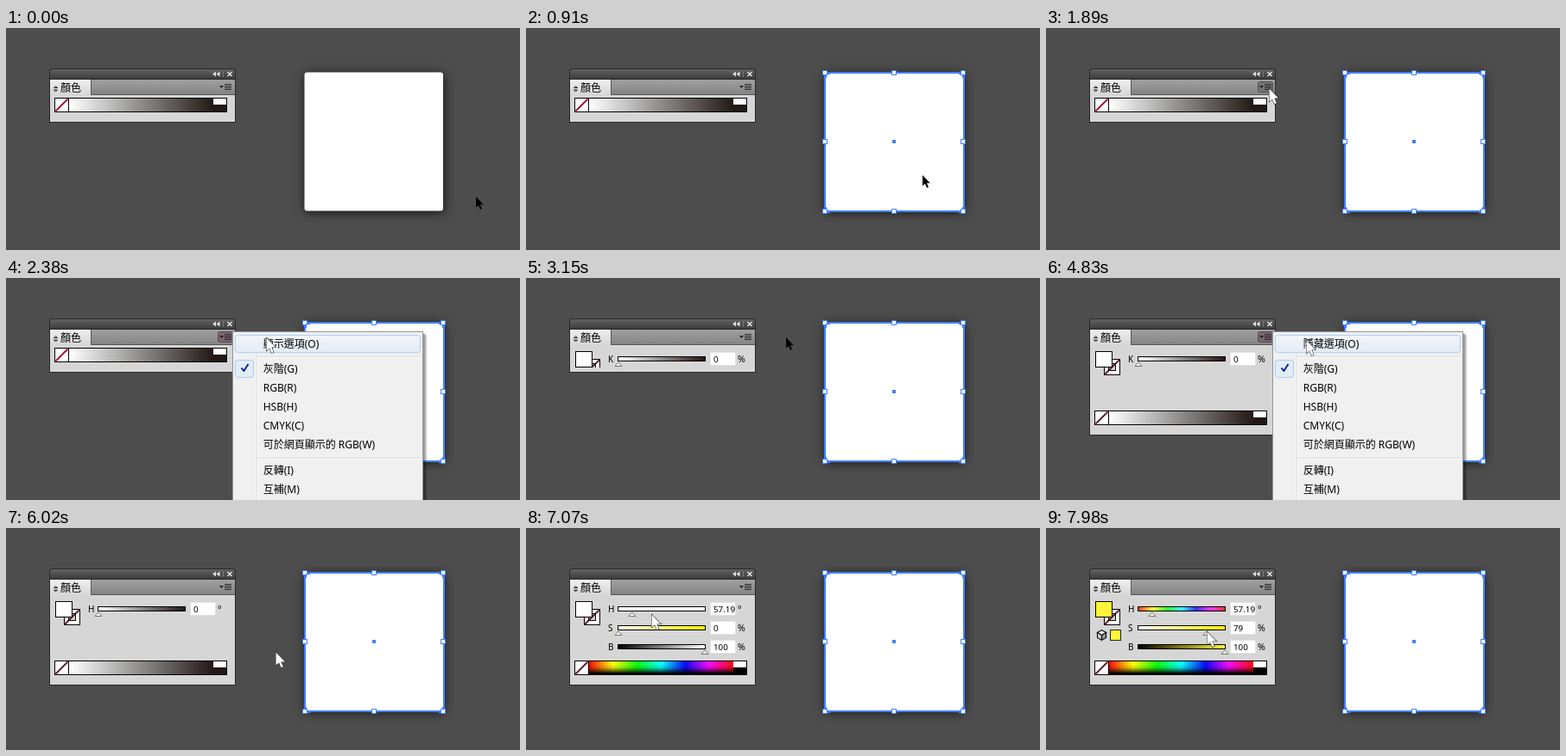
Recreate the animation shown at these times as an HTML page with a canvas. Size 595 px wide and 258 px high, loop 8000 ms.

```html
<!DOCTYPE html>
<html lang="zh-Hant">
<head>
<meta charset="utf-8">
<style>
  html, body { margin: 0; width: 100%; height: 100%; overflow: hidden; background: #4d4d4d; }
  canvas { display: block; }
</style>
</head>
<body>
<canvas width="595" height="258"></canvas>
<script>
const c = document.querySelector('canvas').getContext('2d');
const LOOP = 8000, STEP = 70;
const INK = '#231815', BLUE = '#4080ff', FACE = '#d6d6d6';
const FONT = '"Noto Sans", "Noto Sans CJK TC", "Noto Sans CJK", sans-serif';

// When the interface changes state, in ms
const at = { press: 840, select: 910, open: 1960, choose: 3150, expand: 3220,
  reopen: 4410, pickHsb: 6020, hsb: 6090, leave: 6160, drag: 7280, release: 7980 };

// Pointer key points: first step, last step, destination
const moves = [
  [280, 490, 459, 171], [1120, 1750, 258, 70], [2170, 2380, 301, 69],
  [3920, 4130, 259, 70], [4620, 4830, 301, 72], [4900, 5180, 312, 144],
  [6440, 7070, 145, 100], [7140, 7210, 107, 120], [7280, 7560, 160, 120], [7700, 7910, 186, 120]
];

const ROW = 22, GAP = 7.5;
const labels = ['', '-', '灰階(G)', 'RGB(R)', 'HSB(H)', 'CMYK(C)', '可於網頁顯示的 RGB(W)', '-', '反轉(I)', '互補(M)'];

const arrow = new Path2D('M0 0V12.6L2.9 9.9L5 14.8L7 14L4.9 9.2H8.8Z');

function pointer(t) {
  let x = 544, y = 196;
  for (const [start, end, tx, ty] of moves) {
    if (t < start) break;
    const count = (end - start) / STEP + 1;
    const p = Math.min(1, (Math.floor((t - start) / STEP) + 1) / count);
    const ease = p * p * (3 - 2 * p);
    x += (tx - x) * ease;
    y += (ty - y) * ease;
  }
  return { x: Math.round(x), y: Math.round(y) };
}

function rect(x, y, w, h, fill) {
  c.fillStyle = fill;
  c.fillRect(x, y, w, h);
}

function frame(x, y, w, h, border, fill) {
  rect(x, y, w, h, border);
  rect(x + 1, y + 1, w - 2, h - 2, fill);
}

function rounded(x, y, w, h, r, fill, stroke, width = 1) {
  c.beginPath();
  c.roundRect(x, y, w, h, r);
  paint(fill, stroke, width);
}

function paint(fill, stroke, width = 1) {
  if (fill) { c.fillStyle = fill; c.fill(); }
  if (stroke) { c.strokeStyle = stroke; c.lineWidth = width; c.stroke(); }
}

function line(x0, y0, x1, y1, color, width = 1) {
  c.beginPath();
  c.moveTo(x0, y0);
  c.lineTo(x1, y1);
  paint(null, color, width);
}

// Isosceles triangle from its tip, half base and direction
function triangle(x, y, half, dx, dy, fill, stroke) {
  c.beginPath();
  c.moveTo(x, y);
  c.lineTo(x + dx + (dy ? half : 0), y + dy + (dx ? half : 0));
  c.lineTo(x + dx - (dy ? half : 0), y + dy - (dx ? half : 0));
  c.closePath();
  paint(fill, stroke);
}

function text(s, x, y, size) {
  c.font = `${size}px ${FONT}`;
  c.fillStyle = '#000';
  c.fillText(s, x, y);
}

function gradient(x0, y0, x1, y1, colors) {
  const g = c.createLinearGradient(x0, y0, x1, y1);
  colors.forEach((color, i) => g.addColorStop(i / (colors.length - 1), color));
  return g;
}
const across = (x0, x1, ...colors) => gradient(x0, 0, x1, 0, colors);
const down = (y0, y1, ...colors) => gradient(0, y0, 0, y1, colors);
const hues = light => Array.from({ length: 7 }, (_, i) => `hsl(${i * 60},100%,${light}%)`);
const grays = ['#fff', '#8d8c8b', INK];

function artboard(t) {
  c.save();
  c.shadowColor = 'rgba(0,0,0,.75)';
  c.shadowBlur = 13;
  c.shadowOffsetX = 1;
  c.shadowOffsetY = 2;
  rounded(345.5, 51.5, 160.5, 161, 3, '#fff');
  c.restore();
  if (t < at.press) return;

  rounded(346, 52, 161, 161, 4, null, BLUE, 2);
  if (t < at.select) return;

  for (let i = 0; i < 3; i++) for (let j = 0; j < 3; j++) {
    const x = 346 + i * 80, y = Math.round(52 + j * 80.4);
    if (i === 1 && j === 1) rect(x - 2, y - 2, 4, 4, BLUE);
    else frame(x - 3, y - 3, 6, 6, BLUE, '#fff');
    if (i !== 1 && j !== 1) {
      rect(x + 4 * (1 - i) - 1, y - 1, 3, 3, BLUE);
      rect(x - 1, y + 4 * (1 - j) - 1, 3, 3, BLUE);
    }
  }
}

function spectrum(y, hsb, slash) {
  frame(56, y, 200, 17, '#000', '#fff');
  line(57.5, y + 15.5, 71.5, y + 1.5, slash, 1.8);
  rect(72, y, 1, 17, '#000');
  rect(73, y + 1, 167, 15, across(73, 240, ...(hsb ? hues(52) : grays)));
  if (hsb) rect(73, y + 1, 167, 15, down(y + 1, y + 15,
    'rgba(0,0,0,0)', 'rgba(0,0,0,0)', 'rgba(0,0,0,.12)', 'rgba(0,0,0,.5)', '#000'));
  rect(240, y + 8, 15, 8, hsb ? '#000' : INK);
}

function slider(row, label, colors, percent, value, unit) {
  const y = 94 + row * ROW;
  text(label, 95, y + 4, 10);
  frame(106, y - 3, 102, 6, '#000', across(107, 207, ...colors));
  triangle(107 + percent, y + 4, 4, 0, 4.5, '#fff', '#6b7a66');
  frame(213, y - 8, 30, 16, '#e2e2e2', '#fff');
  text(value, 217, y + 4, 9.8);
  text(unit, 245, y + 4, 10.5);
}

function swatches(fill, slash, bottom) {
  c.save();
  c.beginPath();
  c.rect(50, 80, 50, bottom - 80);
  c.clip();
  frame(67, 94, 19, 19, '#000', '#fff');
  line(68, 112, 85, 95, slash, 1.8);
  frame(72, 99, 9, 9, '#000', FACE);
  line(73, 107, 80, 100, slash, 1.8);
  c.restore();
  frame(57, 85, 20, 19, '#000', fill);
}

function webColorHint(fill) {
  const corner = i => {
    const a = (i * 60 - 150) * Math.PI / 180;
    return [64.5 + 5.8 * Math.cos(a), 124.5 + 5.8 * Math.sin(a)];
  };
  ['#fff', '#999', '#ccc'].forEach((shade, face) => {
    c.beginPath();
    c.moveTo(64.5, 124.5);
    for (let i = 0; i < 3; i++) c.lineTo(...corner(face * 2 + i));
    c.closePath();
    paint(shade, '#111', 1.2);
  });
  frame(74, 118, 13, 13, '#222', fill);
}

function panelFrame(bottom, hover, open) {
  rounded(50, 47, 216, bottom - 47, [4, 4, 0, 0], '#292929');
  rounded(51, 48, 214, 11, [3, 3, 0, 0], down(48, 59, '#626262', '#3c3c3c'));
  for (const x of [239, 243.5]) triangle(x, 53.5, 3, 4, 0, '#ddd');
  rect(251, 50, 1, 7, '#777');
  line(256.5, 51, 261.5, 56, '#e4e4e4', 1.5);
  line(261.5, 51, 256.5, 56, '#e4e4e4', 1.5);

  rect(51, 60, 214, 18, down(60, 78, '#a0a0a0', '#838383'));
  rect(51, 77, 214, 1, '#555');
  rect(51, 78, 214, bottom - 79, FACE);
  rect(51, 60, 47, 18, down(60, 78, '#efefef', FACE));
  rect(98, 60, 1, 18, '#555');
  triangle(57.5, 67.5, 2, 0, 2, null, '#222');
  triangle(57.5, 74, 2, 0, -2, null, '#222');
  text('顏色', 63, 74, 12);

  if (hover) rounded(245.5, 62.5, 17, 12, 2, open ? '#7c6470' : '#757575', '#505050');
  triangle(249.5, 70, 2.5, 0, -3, '#222');
  for (let y = 65; y < 73; y += 2) rect(253, y, 8, 1, '#2c2c2c');
}

function panel(t, m, open) {
  const expanded = t >= at.expand;
  const overButton = m.x >= 245 && m.x < 263 && m.y >= 62 && m.y < 76;
  panelFrame(expanded ? 183 : 110, open || overButton, open);
  if (t < at.choose) { spectrum(81, false, '#a0122c'); return; }

  const hsb = t >= at.hsb, done = t >= at.release;
  const fill = done ? '#fff536' : '#fff', slash = '#5c1a28';
  swatches(fill, slash, expanded ? 120 : 104);
  if (expanded) spectrum(154, hsb, slash);
  if (!hsb) {
    const picked = t >= at.pickHsb;
    slider(0, picked ? 'H' : 'K', grays, 0, '0', picked ? '°' : '%');
    return;
  }
  const saturation = t < at.drag ? 0 : m.x - 107;
  slider(0, 'H', hues(done ? 60.5 : 100), 57.19 / 3.6, '57.19', '°');
  slider(1, 'S', ['#fff', '#fff200'], saturation, saturation, '%');
  slider(2, 'B', ['#000', fill], 100, '100', '%');
  if (done) webColorHint(fill);
}

function menu(t, m) {
  for (const d of [2, 4]) rect(262 + d, 62 + d, 221, 200, 'rgba(0,0,0,.22)');
  frame(262, 62, 221, 220, '#979797', '#f0f0f0');
  rect(290, 64, 1, 200, '#e0e0e0');
  rect(291, 64, 1, 200, '#fff');

  let top = 65.25;
  labels.forEach((label, i) => {
    if (label === '-') {
      const y = Math.round(top + GAP / 2);
      rect(291, y, 189, 1, '#dcdcdc');
      rect(291, y + 1, 189, 1, '#fff');
      top += GAP;
      return;
    }
    const y = Math.floor(top);
    if (m.x >= 264 && m.y >= top && m.y < top + ROW)
      rounded(265.5, y + 1.5, 214, 20, 3, down(y, y + ROW, '#f3f6fa', '#e4ecf6'), '#aecff2');
    if (label === '灰階(G)') {
      rounded(265.5, y + 1.5, 21, 20, 3, '#e2edf9', '#a9cdf0');
      line(272.5, y + 10.5, 275.7, y + 14.5, '#10209a', 2);
      line(275, y + 14.5, 280.5, y + 6, '#10209a', 2);
    }
    text(i ? label : t < at.choose ? '顯示選項(O)' : '隱藏選項(O)', 297.7, y + 16, 12);
    top += ROW;
  });
}

function drawPointer(m, white) {
  c.save();
  c.translate(m.x, m.y);
  if (white) {
    c.translate(0.5, 0.5);
    c.scale(1.2, 1.2);
    c.lineWidth = 0.85;
    c.strokeStyle = '#222';
    c.stroke(arrow);
  }
  c.fillStyle = white ? '#fff' : '#000';
  c.fill(arrow);
  c.restore();
}

function draw(t) {
  const within = (from, to) => t >= from && t < to;
  const m = pointer(t);
  const open = within(at.open, at.choose) || within(at.reopen, at.pickHsb);
  rect(0, 0, 595, 258, '#4d4d4d');
  artboard(t);
  panel(t, m, open);
  if (open) menu(t, m);
  drawPointer(m, open || m.x < 266 || within(at.pickHsb, at.leave));
}

const begin = performance.now();
function tick() {
  draw((performance.now() - begin) % LOOP);
  requestAnimationFrame(tick);
}
tick();
</script>
</body>
</html>
```
